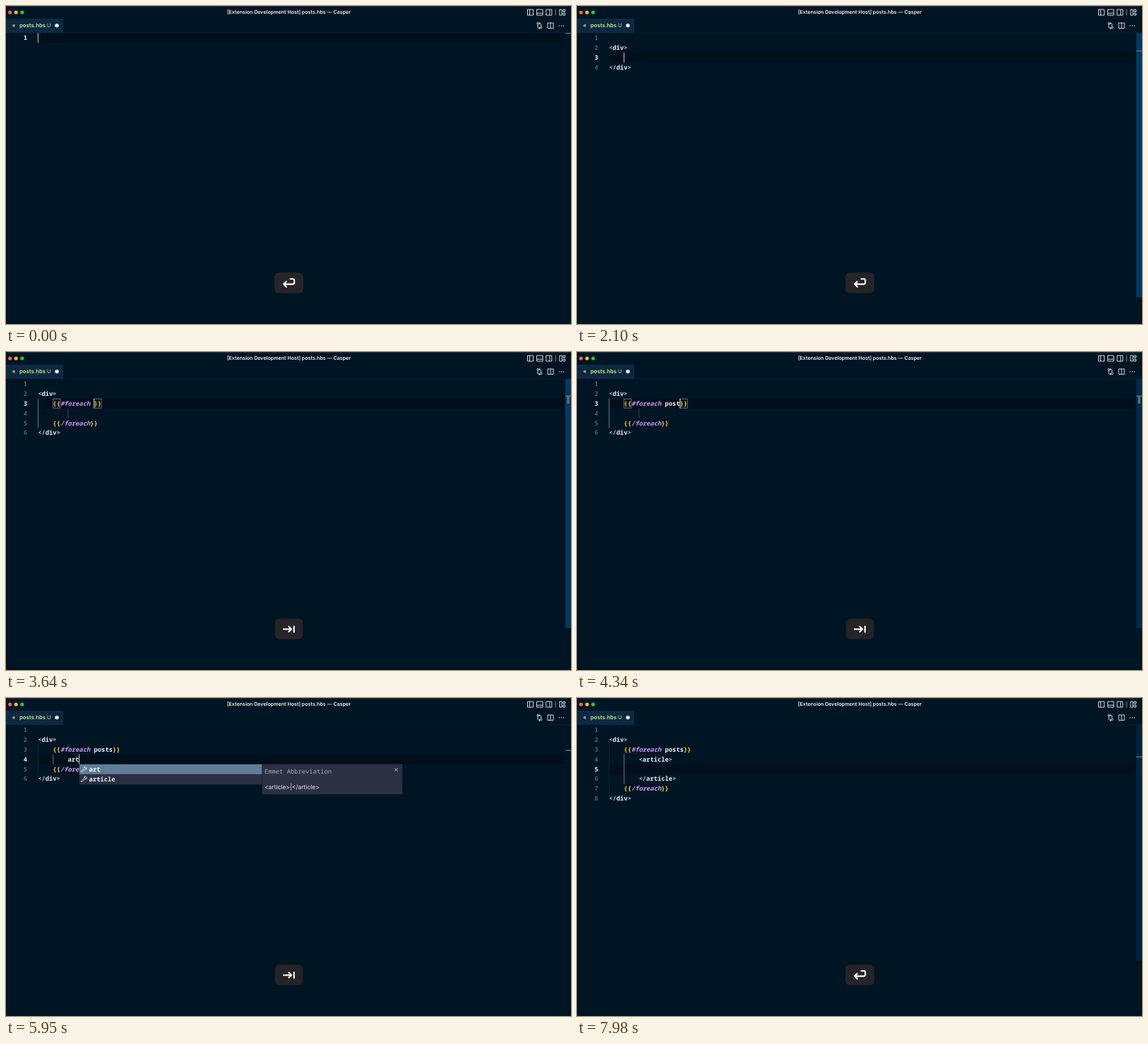
An HTML page that plays this animation: 800x450 px, repeating every 8000 ms.

```html
<!DOCTYPE html>
<html lang="en">
<head>
<meta charset="utf-8">
<title>Snippet demo</title>
<style>
  html, body { margin: 0; height: 100%; overflow: hidden; background: #4a1520; }
  svg { display: block; width: 100vw; height: 100vh; }
  text { white-space: pre; text-rendering: geometricPrecision; }
  .mono { font: 700 8.82px "Noto Sans Mono", "DejaVu Sans Mono", monospace; }
  .ui { font-family: Inter, Roboto, sans-serif; }
  .icon { fill: none; stroke: #d3d8dc; stroke-width: 1; }
  .glyph { fill: none; stroke: #fff; stroke-width: 2.1; stroke-linecap: round; stroke-linejoin: round; }
</style>
</head>
<body>
<svg viewBox="0 0 800 450">
  <rect width="800" height="450" rx="3" fill="#001524"/>
  <g id="editor"></g>
  <g id="chrome">
    <path d="M3 .4H797" stroke="#33424d" stroke-width=".8"/>
    <circle cx="5.7" cy="9" r="2.6" fill="#ff5f57"/>
    <circle cx="14.2" cy="9" r="2.6" fill="#febc2e"/>
    <circle cx="22.8" cy="9" r="2.6" fill="#28c840"/>
    <text class="ui" x="400.5" y="11.4" font-size="7.1" font-weight="600" text-anchor="middle" textRendering="geometricPrecision" fill="#f4f7f9">[Extension Development Host] posts.hbs — Casper</text>
    <path d="M0 37.8H800" stroke="#0b2539" stroke-width=".8"/>
    <rect y="18" width="81" height="20" fill="#0b2942"/>
    <circle cx="11" cy="27.8" r="2" fill="#a58b7c"/>
    <text class="ui" x="19" y="30.3" font-size="7.75" font-weight="600" fill="#cdea80">posts.hbs</text>
    <text class="ui" x="58" y="30.3" font-size="7.5" font-weight="500" fill="#a9c66c">U</text>
    <circle cx="72" cy="27.6" r="2.7" fill="#fff"/>
    <g class="icon">
      <path d="M738.5 5h8v8h-8zM741.5 5v8M751.5 5h8.5v8h-8.5zM751.5 10.2h8.5M764.8 5h8v8h-8zM769.8 5v8M783.8 5h3.2v8h-3.2zM788.8 5h2.7v3h-2.7zM788.8 10h2.7v3h-2.7z"/>
      <path d="M778.2 4.5v9" stroke="#7c8991"/>
      <path d="M767 24h8v7.5h-8zM771 24v7.5M753 26v4q0 1.3 1.3 1.3h2.2M757.6 29v-2.8q0-1.6-1.6-1.6h-1.8M755 29.8l1.6 1.5-1.6 1.5M755.7 23.2l-1.5 1.4 1.5 1.4"/>
      <circle cx="753" cy="24.7" r="1.2"/><circle cx="757.7" cy="30.5" r="1.2"/>
    </g>
    <path d="M782.7 27.8h1.3M785.7 27.8h1.3M788.7 27.8h1.3" stroke="#d3d8dc" stroke-width="1.2"/>
  </g>
  <g id="key"></g>
</svg>
<script>
const LOOP = 8000, LEFT = 45.2, CHAR = 5.292, TOP = 38.2, ROW = 13.85, VIEW = 412;
const editor = document.getElementById("editor");
const keyCap = document.getElementById("key");

// Document snapshots; "|" marks the caret.
const inDiv = body => `\n<div>\n${body}\n</div>`;
const loop = (head, body) => inDiv(`    {{#foreach ${head}}}\n        ${body}\n    {{/foreach}}`);
const steps = [
  [0, "|"], [70, "\n|"],
  [420, "\nd|", "d"], [560, "\ndi|", "di"], [700, "\ndiv|", "div"],
  [1050, "\n<div>|</div>"], [1610, inDiv("    |")],
  [2730, inDiv("    f|"), "f"], [2940, inDiv("    fo|"), "fo"],
  [3080, inDiv("    for|"), "for"], [3220, inDiv("    fore|"), "fore"],
  [3500, loop("|", "")], [3850, loop("p|", "")], [4060, loop("po|", "")],
  [4200, loop("pos|", "")], [4340, loop("post|", "")], [4550, loop("posts|", "")],
  [5110, loop("posts", "|")],
  [5530, loop("posts", "a|"), "a"], [5740, loop("posts", "ar|"), "ar"], [5880, loop("posts", "art|"), "art"],
  [6160, loop("posts", "<article>|</article>")],
  [7000, loop("posts", "<article>\n            |\n        </article>")]
];
const suggestions = {
  d: "data datag datal datalist dd del details dialog dir div dl dt",
  di: "dialog dir div", div: "div",
  f: "fieldset fieldset:d fieldset:disabled fig figc figcaption figure font footer foreach form form:get",
  fo: "font footer foreach form form:get form:post", for: "foreach form form:get form:post", fore: "foreach",
  a: "a a:blank a:link a:mail a:tel abbr acr acronym address area art article",
  ar: "area art article", art: "art article"
};
const keyPresses = [[0, "enter"], [1050, "tab"], [1610, "enter"], [3500, "tab"], [5110, "tab"], [6090, "tab"], [7000, "enter"]];
const resizes = [70, 1610, 3500, 7000];   // moments when the line count grows

const latest = (list, t) => list.filter(entry => entry[0] <= t).pop();
const clamp = v => Math.max(0, Math.min(1, v));
const escape = s => s.replace(/&/g, "&amp;").replace(/</g, "&lt;");
const rect = (x, y, w, h, fill, extra = "") => `<rect x="${x}" y="${y}" width="${w}" height="${h}" fill="${fill}" ${extra}/>`;
const text = (x, y, content, fill, extra = 'class="mono"') => `<text x="${x}" y="${y}" fill="${fill}" ${extra}>${content}</text>`;
const colX = col => LEFT + col * CHAR;
const rowY = row => TOP + row * ROW;
const indentOf = line => line.length - line.trimStart().length;

function colourize(line) {
  return line.replace(/(<\/?|>)|(\{\{|\}\})|([#\/]foreach)|[^<>{}#\/]+/g, (part, angle, brace, helper) => {
    const fill = angle ? "#7ff0dc" : brace ? "#ffd42a" : helper ? "#cf98f2" : "#e6f4f8";
    return `<tspan fill="${fill}"${helper ? ' font-style="italic"' : ""}>${escape(part)}</tspan>`;
  });
}

function popup(prefix, x, y) {
  const items = suggestions[prefix].split(" ");
  let out = rect(x, y, 258.5, items.length * ROW + 1, "#2c3043") + rect(x, y + .3, 258.5, ROW, "#5f7e97");
  items.forEach((item, i) => {
    const mid = y + (i + .5) * ROW + .4;
    const icon = item === "foreach"
      ? '<path class="icon" d="M-3.5-3.7h7v7.4h-7z"/>'
      : '<path class="icon" d="M-3.7 2.6L.2-1.2Q-.7-3.8 2.4-4L1.2-2.3 2.4-1.1 4-2.4Q4 .8 1.3 0L-2.5 3.8Q-4.4 4.4-3.7 2.6z"/>';
    out += `<g transform="translate(${x + 6.5} ${mid})">${icon}</g>`;
    out += text(x + 13.7, mid + 3, `<tspan fill="#fff" font-weight="800">${prefix}</tspan>${item.slice(prefix.length)}`, "#e2e6ed");
  });
  if (items[0] !== "foreach") {
    const tag = items[0] === "art" ? "article" : items[0];
    const docX = x + 258.8;
    out += rect(docX, y, 198.5, 42.7, "#2c3043");
    out += text(docX + 3.2, y + 13, "Emmet Abbreviation", "#a9adba", 'class="mono" style="font-weight:500"');
    out += text(docX + 3.2, y + 35.8, escape(`<${tag}>|</${tag}>`), "#e6e8ee", 'class="ui" font-size="8.5"');
    out += `<path class="icon" d="M${docX + 187.7} ${y + 6}l4 4m0-4l-4 4"/>`;
  }
  return out;
}

function drawEditor(t) {
  const [start, source, prefix] = latest(steps, t);
  const marked = source.split("\n");
  const row = marked.findIndex(line => line.includes("|"));
  const col = marked[row].indexOf("|");
  const lines = marked.map(line => line.replace("|", ""));
  const levels = lines.map((line, i) => indentOf(line.trim() ? line : lines[i + 1] || "") / 4);
  const matching = marked[row].includes("|}}");

  let out = rect(colX(0), rowY(row), 791 - colX(0), ROW, "#000f1b");

  // Indent guides; the one enclosing the caret is brighter.
  let first = row, last = row;
  while (levels[first - 1] >= levels[row]) first--;
  while (levels[last + 1] >= levels[row]) last++;
  levels.forEach((level, i) => {
    for (let k = 0; k < level; k++) {
      const active = k === levels[row] - 1 && i >= first && i <= last;
      out += rect(colX(k * 4), rowY(i), .8, ROW, active ? "#7d929f" : "#12293a");
    }
  });

  lines.forEach((line, i) => {
    const y = rowY(i) + 9.9, indent = indentOf(line);
    out += text(30, y, i + 1, i === row ? "#f0f7fb" : "#4b6479",
      `class="mono" text-anchor="end" style="font-weight:${i === row ? 700 : 600}"`);
    out += text(colX(indent), y, colourize(line.slice(indent)), "#e6f4f8");
  });

  if (matching) {
    for (const c of [4, col])
      out += rect(colX(c), rowY(row) + .7, 2 * CHAR, ROW - 1.2, "none", 'stroke="#8d8d80" stroke-width=".7"');
    out += rect(colX(8), rowY(row + 1), .7, ROW, "#425463");
  }
  if (Math.floor((t - start) / 500) % 2 === 0)
    out += rect(colX(col) - .3, rowY(row), 1, ROW, "#c9d3da");

  // Scrollbar with its caret mark; the slider lingers, then fades.
  const scale = VIEW / (VIEW + (lines.length - 1) * ROW);
  const resized = resizes.filter(time => time <= t).pop() ?? -LOOP;
  const alpha = clamp(1 - (t - resized - 500) / 800);
  const markY = 38 + row * ROW * scale;
  out += rect(791.3, 38, .6, VIEW, "#041b2b");
  out += rect(792, 38, 8, VIEW * scale, "#084d81", `opacity="${.65 * alpha}"`);
  if (matching) out += rect(794.2, markY, 3.6, 11.5, "#576975");
  out += rect(792, markY, 8, 1.2, "#6e7f89");

  if (prefix) out += popup(prefix, colX(col) + .5, rowY(row + 1));
  editor.innerHTML = out;
}

function drawKey(t) {
  const [pressed, name] = latest(keyPresses, t);
  const width = name === "enter" ? 41 : 39.5;
  const path = name === "enter"
    ? "M402.5 386.2H406.4Q408.2 386.2 408.2 388V391.6Q408.2 393.6 406.2 393.6H393.5M397 389.8L393.2 393.6 397 397.4"
    : "M393 392.2H404M400.4 388.6L404.2 392.2 400.4 395.8M407.8 388.2V396.2";
  keyCap.setAttribute("opacity", clamp(1 - (t - pressed - 1050) / 210));
  keyCap.innerHTML = rect(400.6 - width / 2, 377.2, width, 29.3, "#262428", 'rx="6.5"') + `<path class="glyph" d="${path}"/>`;
}

function frame() {
  const t = performance.now() % LOOP;
  drawEditor(t);
  drawKey(t);
  requestAnimationFrame(frame);
}
frame();
</script>
</body>
</html>
```
